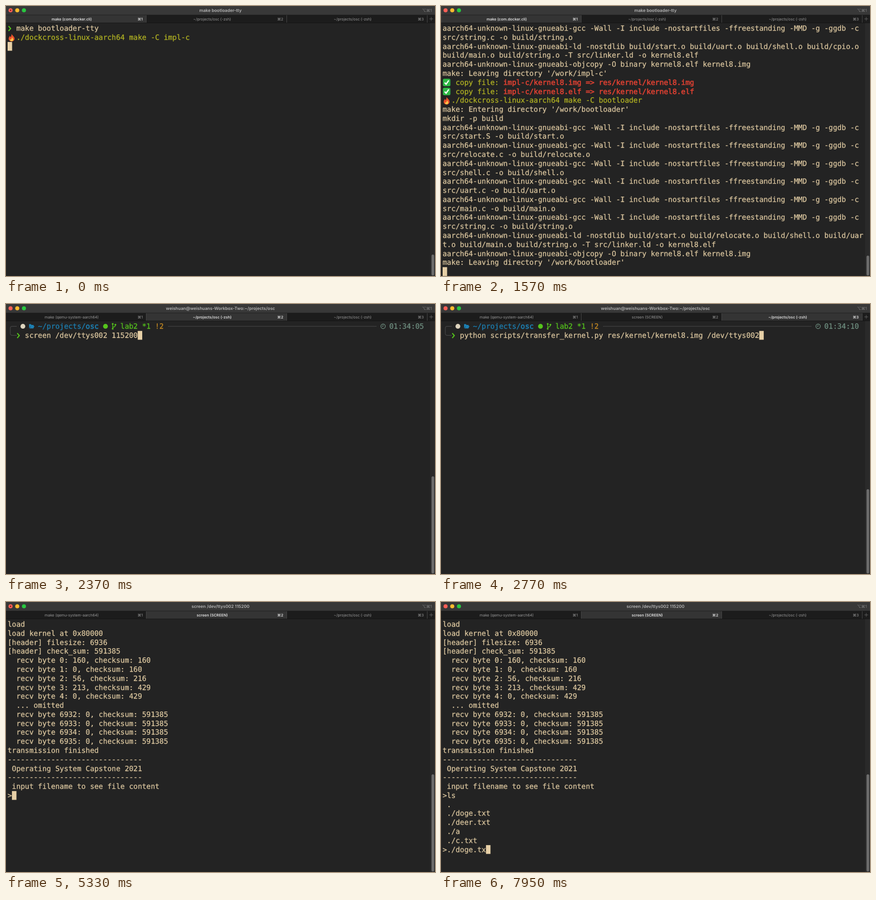
These frames come from a looping animation (800x503 px, 8000 ms). An HTML page with a canvas:

```html
<!DOCTYPE html>
<html lang="en">
<head>
<meta charset="utf-8">
<title>Terminal session</title>
<style>
html, body { margin: 0; width: 100%; height: 100%; overflow: hidden; background: #232323; }
canvas { display: block; width: 800px; height: 503px; }
</style>
</head>
<body>
<canvas id="stage"></canvas>
<script>
const W = 800, H = 503, LOOP = 8000;
const CELL = 8.088, LINE = 16.78, LEFT = 3, TOP = 33.2, ROWS = 28;
const MONO = '"DejaVu Sans Mono", "Noto Sans Mono", monospace';
const UI = 'Inter, "DejaVu Sans", sans-serif';
const COLORS = {
  t: '#ddc8a0', y: '#b3b423', o: '#8f8d20', a: '#c68a22', r: '#dc4032', d: '#a82a22',
  g: '#6f675f', c: '#6f8f80', p: '#a5577c', q: '#5c9a7c', n: '#55c41c', b: '#1c80b4', k: '#55605f'
};

const canvas = document.getElementById('stage');
const ctx = canvas.getContext('2d');
const dpr = window.devicePixelRatio || 1;
canvas.width = W * dpr;
canvas.height = H * dpr;
ctx.textRendering = 'geometricPrecision';

const colX = c => LEFT + c * CELL;
const rowY = r => TOP + r * LINE;

function rect(x, y, w, h, color) {
  ctx.fillStyle = color;
  ctx.fillRect(x, y, w, h);
}

function disc(x, y, r, color) {
  ctx.fillStyle = color;
  ctx.beginPath();
  ctx.arc(x, y, r, 0, Math.PI * 2);
  ctx.fill();
}

function round(x, y, w, h, r, color) {
  ctx.fillStyle = color;
  ctx.beginPath();
  ctx.roundRect(x, y, w, h, r);
  ctx.fill();
}

function shape(d, color, width) {
  const path = new Path2D(d);
  if (width) {
    ctx.strokeStyle = color;
    ctx.lineWidth = width;
    ctx.stroke(path);
  } else {
    ctx.fillStyle = color;
    ctx.fill(path);
  }
}

// Icons are drawn from the top left corner of their cell.
const ICONS = {
  '🔥'() {
    shape('M7 2C9 5 13 7 13 11C13 14 10 16 7.500 16C4 16 2 13.500 2 11C2 8.500 3.500 7.500 4 5.500L5.500 8C7 6 7.500 4 7 2Z', '#e8502a');
    shape('M8 8C9 10 11 11 10.500 13C10 15 8.800 15.500 7.500 15.500C5.500 15.500 4.200 14 4.500 12L6 12.500C7.500 11.500 8 10 8 8Z', '#ffc94a');
  },
  '✅'() {
    round(.5, 1.5, 14, 14, 2.5, '#2fb845');
    shape('M3.800 8.800L6.500 11.800L11.500 4.800', '#fff', 2.2);
  },
  '📦'() {
    shape('M1 5L7.500 2L14 5V12.500L7.500 15.500L1 12.500Z', '#a9794a');
    shape('M1 5L7.500 8L14 5L7.500 2Z', '#cfa06a');
    shape('M7.500 8V15.500L14 12.500V5Z', '#86592f');
    shape('M4 3.500L10.500 6.700V9', '#e4c99b', 1.4);
  },
  '🚧'() {
    rect(3, 4, 1.5, 11, '#9a9a9a');
    rect(11, 4, 1.5, 11, '#9a9a9a');
    for (const y of [5, 10]) {
      rect(.5, y, 14, 3.6, '#e3bb3c');
      for (const x of [1, 6, 11]) shape(`M${x} ${y + 3.6}l2-3.600h1.500l-2 3.600z`, '#222');
    }
    disc(3.7, 3.4, 1.3, '#e0a030');
    disc(11.7, 3.4, 1.3, '#e0a030');
  },
  '❯'() { shape('M1.800 4.300L5.600 8.800L1.800 13.300', COLORS.n, 2); }
};

function icon(ch, col, row) {
  ctx.save();
  ctx.translate(colX(col), rowY(row));
  ICONS[ch]();
  ctx.restore();
}

// Prints a line on the cell grid; {x} switches colour, a capital letter means bold.
function print(line, row, col = 0) {
  const y = rowY(row) + 12.9;
  let style = 't';
  ctx.font = `13.43px ${MONO}`;
  ctx.textAlign = 'left';
  line.split(/\{(\w)\}/).forEach((part, i) => {
    if (i % 2) { style = part; return; }
    const key = style.toLowerCase();
    for (const ch of part) {
      if (ICONS[ch]) {
        icon(ch, col, row);
        col += ch === '❯' ? 1 : 2;
        continue;
      }
      // A thin outline gives the medium and bold weights.
      ctx.fillStyle = ctx.strokeStyle = COLORS[key];
      ctx.lineWidth = key === style ? .25 : .6;
      if (ch !== ' ') {
        ctx.fillText(ch, colX(col), y);
        ctx.strokeText(ch, colX(col), y);
      }
      col++;
    }
  });
  return col;
}

function cursor(col, row) {
  rect(colX(col), rowY(row) + .2, 8.4, 16.4, '#e6cfa6');
}

function printAll(lines, from = 0) {
  lines.forEach((line, i) => print(line, from + i));
}

function label(text, x, y, size, weight, color, align = 'center') {
  ctx.font = `${weight} ${size}px ${UI}`;
  ctx.textAlign = align;
  ctx.fillStyle = color;
  ctx.fillText(text, x, y);
}

// Value of the last step that has started.
const at = (t, steps) => steps.filter(s => s[0] <= t).pop()[1];

const gcc = name => [
  'aarch64-unknown-linux-gnueabi-gcc -Wall -I include -nostartfiles -ffreestanding -MMD -g -ggdb -c',
  `src/${name}.${name === 'start' ? 'S' : 'c'} -o build/${name}.o`
];

const build = (dir, out, files, link) => [
  `🔥{y}./dockcross-linux-aarch64 make -C ${dir}`,
  `make: Entering directory '/work/${dir}'`,
  'mkdir -p build',
  ...files.split(' ').flatMap(gcc),
  ...link,
  'aarch64-unknown-linux-gnueabi-objcopy -O binary kernel8.elf kernel8.img',
  `make: Leaving directory '/work/${dir}'`,
  ...['img', 'elf'].map(e => `✅{y} copy file: {R}${dir}/kernel8.${e} => res/${out}/kernel8.${e}`)
];

const LD = 'aarch64-unknown-linux-gnueabi-ld -nostdlib build/start.o build/';
const LOG = [
  '❯ make bootloader-tty',
  ...build('impl-c', 'kernel', 'start uart shell cpio main string', [
    LD + 'uart.o build/shell.o build/cpio.o',
    'build/main.o build/string.o -T src/linker.ld -o kernel8.elf'
  ]),
  ...build('bootloader', 'bootloader', 'start relocate shell uart main string', [
    LD + 'relocate.o build/shell.o build/uar',
    't.o build/main.o build/string.o -T src/linker.ld -o kernel8.elf'
  ]),
  ' 📦{o} Generate ramfs file from {a}res/rootfs{o} to {a}res/initramfs.cpio',
  'cd res/rootfs && find . |  cpio -o -H newc> ../initramfs.cpio',
  '9 blocks',
  ' 📦{a} Build Finished',
  ' 🚧{a} Start bootloader(tty)',
  ' {a}Use {d}ctrl-c{a} to quit session'
];

// Byte index, value and running checksum.
const HEAD = [[0, 160, 160], [1, 0, 160], [2, 56, 216], [3, 213, 429], [4, 0, 429]];
const TAIL = [6932, 6933, 6934, 6935].map(i => [i, 0, 591385]);
const sent = ([i, v, sum]) =>
  `byte {y}${i}{t}: ${v.toString(16).padStart(2, '0')}(hex), ${String(v).padStart(3)}(dec), checksum:${sum}`;
const received = ([i, v, sum]) => `  recv byte ${i}: ${v}, checksum: ${sum}`;

const SEND = 'python scripts/transfer_kernel.py res/kernel/kernel8.img /dev/ttys002';
const OUTPUT = [
  '❯ ' + SEND,
  '{y}Load image from {g}res/kernel/kernel8.img',
  '    📦{y}image size: {T}6936 bytes',
  ...HEAD.map(sent),
  '{o} omitted...',
  ...TAIL.map(sent)
];
const RULE = '-'.repeat(31);
const SCREEN = [
  'load',
  'load kernel at 0x80000',
  '[header] filesize: 6936',
  '[header] check_sum: 591385',
  ...HEAD.map(received),
  '  ... omitted',
  ...TAIL.map(received),
  'transmission finished',
  RULE,
  ' Operating System Capstone 2021',
  RULE,
  ' input filename to see file content'
];
const LISTING = ['>ls', ' .', ' ./doge.txt', ' ./deer.txt', ' ./a', ' ./c.txt'];

function prompt(row, command, clock, git = 'n') {
  const y = rowY(row), mid = y + 8.4;
  shape(`M20 ${mid}H11Q8 ${mid} 8 ${mid + 3}V${mid + 13.8}Q8 ${mid + 16.8} 11 ${mid + 16.8}H20`, '#4b4b4b', 1);
  disc(31.5, mid, 4.5, '#ddd3bd');
  shape(`M43 ${mid + 4}V${mid - 4}h3.500l1 1.500h4v2h-5.500zM44 ${mid + 4}l2.200-4.500h7l-2.200 4.500z`, COLORS.b);
  print('{b}~/projects/{B}osc', row, 7);
  const green = COLORS[git];
  disc(185.5, mid, 4.5, green);
  shape(`M199 ${mid - 4}V${mid + 4}M204 ${mid - 2}Q204 ${mid + 1} 199 ${mid + 2}`, green, 1.3);
  for (const [x, dy] of [[199, -4.5], [199, 4.5], [204, -3]]) disc(x, mid + dy, 1.7, green);
  print(`{${git}}lab2 *1 {${git === 'n' ? 'a' : git}}!2`, row, 26);
  rect(302, mid - .5, 389, 1, '#454545');
  ctx.strokeStyle = COLORS.c;
  ctx.lineWidth = 1.2;
  ctx.beginPath();
  ctx.arc(703.2, mid, 4.2, 0, Math.PI * 2);
  ctx.stroke();
  shape(`M703.200 ${mid - 2.5}V${mid}H701`, COLORS.c, 1);
  print(`{c}${clock}`, row, 88);
  cursor(print('❯ ' + command, row + 1, 2), row + 1);
}

function drawBuild(t) {
  const count = at(t, [[0, 2], [190, 8], [390, 16], [590, 20], [770, 23],
    [1170, 35], [1570, 41], [1770, 45], [1970, 49]]);
  const top = Math.max(0, count + 1 - ROWS);
  printAll(LOG.slice(top, count));
  cursor(0, count - top);
}

function drawScreen(t) {
  if (t < 2390) return prompt(0, 'screen /dev/ttys002 115200', '01:34:05');
  if (t < 2570) return cursor(0, 0);
  if (t < 2770) {
    printAll(SCREEN.slice(0, 2));
    return cursor(0, 2);
  }
  printAll(SCREEN);
  let row = SCREEN.length;
  if (t >= 7150) {
    printAll(LISTING, row);
    row += LISTING.length;
  }
  const typed = at(t, [[0, ''], [6530, 'l'], [6950, 'ls'], [7150, ''], [7350, './'],
    [7550, './do'], [7750, './doge'], [7950, './doge.tx']]);
  cursor(print('>' + typed, row), row);
}

function drawTransfer(t) {
  if (t < 3530) return prompt(0, SEND, '01:34:10');
  if (t < 3950) {
    print(OUTPUT[0], 0);
    return cursor(0, 1);
  }
  printAll(OUTPUT);
  const row = OUTPUT.length, done = t >= 4130;
  print('{c}transfer image...', row);
  rect(149, rowY(row) + 7.7, done ? 429 : 240, 1.5, '#8f9020');
  print(done ? '{p}100.0% {o}6.9/6.9 KB {q}0:00:00' : '{p} 56.0% {o}3.9/6.9 KB {q}0:00:01', row, 72);
  if (t < 4330) return cursor(0, row + 1);
  prompt(row + 2, '', '01:34:18', t < 4730 ? 'k' : 'n');
}

function drawChrome(t, tab) {
  const home = '~/projects/osc (-zsh)';
  const sending = t >= 3530 && t < 4730;
  const titles = [
    'make bootloader-tty',
    t < 2390 ? 'weishuan@weishuans-Workbox-Two:~/projects/osc' : 'screen /dev/ttys002 115200',
    sending ? 'python3 scripts/transfer_kernel.py res/kernel/kernel8.img /dev/ttys002'
      : 'weishuan@weishuans-Workbox-Two:~/projects/osc'
  ];
  const names = [
    at(t, [[0, 'make (com.docker.cli)'], [590, 'make (python3)'], [1170, 'make (com.docker.cli)'],
      [1970, 'make (qemu-system-aarch64)']]),
    t < 2390 ? home : 'screen (SCREEN)',
    sending ? 'python (-zsh)' : home
  ];

  rect(0, 0, W, 17, '#383838');
  ['#ff5f57', '#febc2e', '#28c840'].forEach((c, i) => disc(8.5 + i * 12.5, 8, 3.8, c));
  if (t < 190 || (t >= 5330 && t < 6950)) disc(8.5, 8, 1.3, '#7d1a14');
  label(titles[tab], 400, 11, 8, 600, '#b4b4b4');
  label('⌥⌘1', 794, 10.5, 7.5, 400, '#858585', 'right');

  rect(0, 17, W, 14.5, '#1c1c1c');
  names.forEach((name, i) => {
    const x = i * 262, on = i === tab;
    const color = on ? '#e4e4e4' : '#9c9c9c', weight = on ? 600 : 400;
    if (on) rect(x, 17, 261, 14.5, '#343434');
    rect(x + 261, 17, 1, 14.5, '#434343');
    label(name, x + 122.5, 26.7, 7, weight, color);
    label('⌘' + (i + 1), x + 255, 26.7, 7, weight, color, 'right');
  });
  rect(0, 16.5, W, .7, '#161616');
  rect(0, 31, W, .8, '#151515');
  shape('M789.500 24H796.500M793 20.500V27.500', '#6a6a6a', .8);

  rect(791, 31.8, 9, H, '#2a2a2a');
  const top = [t < 1170 ? 463 : 465, 321, 345][tab];
  round(793.5, top, 5, 502 - top, 2.5, '#6d6d6d');
}

function draw(t) {
  const tab = at(t, [[0, 0], [2190, 1], [2770, 2], [5130, 1]]);
  ctx.setTransform(dpr, 0, 0, dpr, 0, 0);
  rect(0, 0, W, H, '#232323');
  drawChrome(t, tab);
  [drawBuild, drawScreen, drawTransfer][tab](t);
}

const start = performance.now();
function tick() {
  draw((performance.now() - start) % LOOP);
  requestAnimationFrame(tick);
}
tick();
</script>
</body>
</html>
```
